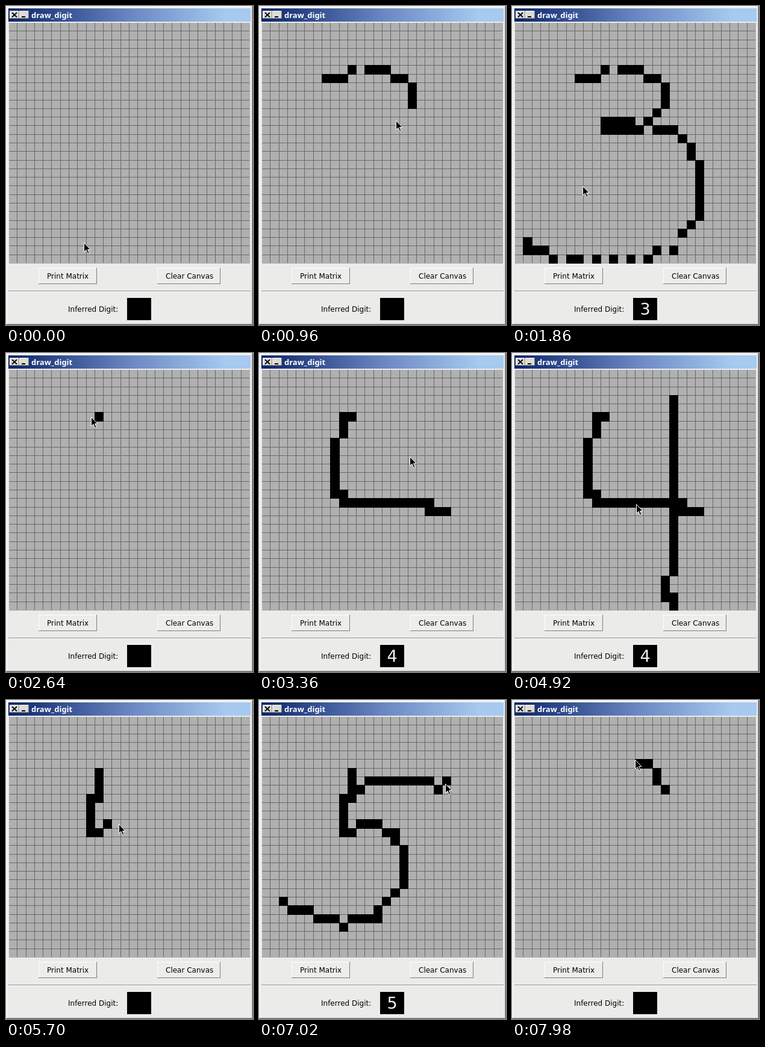
These frames come from a looping animation (410x530 px, 8000 ms). An HTML page:

```html
<!DOCTYPE html>
<html lang="en">
<head>
<meta charset="utf-8">
<title>draw_digit</title>
<style>
  html, body { margin: 0; width: 100%; height: 100%; overflow: hidden; background: #ebebe9; }
  svg { position: absolute; left: 0; top: 0; }
  span { position: absolute; white-space: pre; font: 12px/14px "DejaVu Sans", sans-serif; color: #000; }
  .title { left: 42px; top: 6px; font: bold 13px/18px "Noto Sans", "Open Sans", sans-serif; color: #fff; }
  #digit { left: 201px; top: 488px; width: 40px; text-align: center; font-size: 27px; line-height: 31px; color: #f2f2f2; }
  .crisp { shape-rendering: crispEdges; }
</style>
</head>
<body>
<svg width="410" height="530">
  <defs>
    <linearGradient id="bar">
      <stop offset="0" stop-color="#0a246a"/>
      <stop offset=".5" stop-color="#6986c2"/>
      <stop offset=".9" stop-color="#a6caf0"/>
    </linearGradient>
  </defs>
  <g class="crisp">
    <path d="M1.5 529V1.5H408" fill="none" stroke="#fff"/>
    <path d="M408.5 1V528.5H1" fill="none" stroke="#a0a09c"/>
    <path d="M409.5 0V529.5H0" fill="none" stroke="#606060"/>
    <rect x="4" y="4" width="402" height="22" fill="url(#bar)"/>
    <g id="bevels"></g>
    <rect x="26" y="17" width="6" height="2"/>
    <rect x="5" y="28" width="400" height="400" fill="#b0b0b0"/>
    <path id="grid" fill="none" stroke="#686868"/>
    <path id="cells"/>
    <path d="M4 473.5H406" stroke="#8c8c8a"/>
    <path d="M4 474.5H406" stroke="#fff"/>
    <rect x="201" y="485" width="40" height="37"/>
  </g>
  <path d="M10 11L18 18.5M18 11L10 18.5" stroke="#000" stroke-width="1.8"/>
  <path id="cursor" d="M0 0V15L3.5 11.8L6.2 18L8.6 17L6 11H10.5Z" stroke="#fff"/>
</svg>
<span class="title">draw_digit</span>
<span style="left:68px;top:442px">Print Matrix</span>
<span style="left:265px;top:442px">Clear Canvas</span>
<span style="left:103px;top:497px">Inferred Digit:</span>
<span id="digit"></span>

<script>
const LOOP = 8000, STEP = 60, PAINT_LAG = 20;
const COUNT = 28, PITCH = 400 / COUNT, LEFT = 4, TOP = 27;
const byId = id => document.getElementById(id);
const lineX = i => LEFT + Math.round(i * PITCH);
const lineY = i => TOP + Math.round(i * PITCH);

const track = [], painted = [], readings = [];
let cleared = 0;

// The pointer glides to a place, arriving at the given time.
function move(time, x, y) {
  track.push({ time, x, y });
}

function infer(time, digit) {
  readings.push({ time, digit });
}

function clearCanvas(time) {
  move(time, 292, 442);
  infer(time, "");
  for (const cell of painted) cell.until ??= time;
}

// Corner cells "col,row" joined by lines; ".." is a fast line that skips every other cell.
function rasterize(path) {
  const cells = [];
  let from;
  for (const [, gap, col, row] of path.matchAll(/( |\.\.|^)([\d]+(?:\.\d+)?),(\d+(?:\.\d+)?)/g)) {
    const to = [+col, +row];
    from ??= to;
    const n = Math.round(Math.max(Math.abs(to[0] - from[0]), Math.abs(to[1] - from[1])));
    const stride = gap === ".." ? 2 : 1;
    for (let k = 0; k < n || !cells.length;) {
      k = Math.min(k + stride, n);
      cells.push(from.map((v, axis) => Math.round(v + (to[axis] - v) * (n ? k / n : 0))));
    }
    from = to;
  }
  return cells;
}

function draw(start, end, path) {
  const cells = rasterize(path);
  cells.forEach(([col, row], i) => {
    const time = start + (end - start) * i / (cells.length - 1);
    painted.push({ time: time + PAINT_LAG, col, row });
    track.push({ time, x: LEFT + (col + .5) * PITCH, y: TOP + (row + .5) * PITCH, drawing: i > 0 });
  });
}

infer(0, "");
move(0, 129, 393);
draw(720, 1650, "7,6 9,6 10,5..12,5 14,5 17,7 17,9 15,11..13,11 10,11 10,12 14,12..16,12 18,12 21,16 " +
  "21,22 19,24..18,26..16,26..15,27..7,27 6,27..4,27 3,26 1,26 1,25");
infer(1670, "3");
move(1860, 117, 299);
clearCanvas(2200);

draw(2620, 3170, "10,5 9,5 9,7 8,8 8,14 9,14 9,15 19,15 19,16 21,16");
infer(3190, "4");
move(3360, 250, 172);
draw(3560, 4020, "18,3 18,23 17,24 17,26 18,26 18,27");
move(4140, 200, 430);
move(4920, 206, 251);
clearCanvas(5030);

draw(5480, 6160, "10,6 10,9 9,9 9,13 11,12 13,12 15,13 16,16 16,19 13,22 13,23 10,23 9,24 8,23.4 2,21.4");
infer(6190, "5");
move(6480, 130, 147);
draw(6690, 6990, "10,8 11,8 12,7 19,7 20,8 21,7");
move(7020, 309, 139);
clearCanvas(7530);

draw(7820, 7930, "17,8 16,7 16,6 15,5 14,5");
move(7980, 204, 99);

function pointerAt(t) {
  const i = track.findIndex(key => key.time > t);
  if (i < 0) return track[track.length - 1];
  const a = track[i - 1], b = track[i];
  let u = (t - a.time) / (b.time - a.time);
  if (!b.drawing) u = (1 - Math.cos(Math.PI * u)) / 2;
  return { x: a.x + (b.x - a.x) * u, y: a.y + (b.y - a.y) * u };
}

function cellPath({ col, row }) {
  const x = lineX(col), y = lineY(row);
  return `M${x} ${y}H${lineX(col + 1) + 1}V${lineY(row + 1) + 1}H${x}Z`;
}

function bevel(x, y, w, h, fill) {
  return `<rect x="${x}" y="${y}" width="${w}" height="${h}" fill="${fill}"/>` +
    `<path d="M${x + .5} ${y + h}V${y + .5}H${x + w}" fill="none" stroke="#fff"/>` +
    `<path d="M${x + w - .5} ${y}V${y + h - .5}H${x}" fill="none" stroke="#7c7c7a"/>`;
}

byId("bevels").innerHTML = bevel(6, 8, 16, 13, "#dedbd5") + bevel(22, 8, 16, 13, "#dedbd5") +
  bevel(54, 435, 97, 27, "#ededeb") + bevel(251, 435, 105, 27, "#ededeb");

let grid = "";
for (let i = 1; i < COUNT; i++)
  grid += `M${lineX(i) + .5} 28V427M5 ${lineY(i) + .5}H404`;
byId("grid").setAttribute("d", grid);

function render(t) {
  const visible = painted.filter(cell => cell.time <= t && !(cell.until <= t));
  byId("cells").setAttribute("d", visible.map(cellPath).join(""));
  byId("digit").textContent = readings.filter(r => r.time <= t).pop().digit;
  const { x, y } = pointerAt(t);
  byId("cursor").setAttribute("transform", `translate(${Math.round(x) + .5} ${Math.round(y) + .5})`);
}

const began = performance.now();
function tick() {
  const t = (performance.now() - began) % LOOP;
  render(Math.floor(t / STEP) * STEP);
  requestAnimationFrame(tick);
}
tick();
</script>
</body>
</html>
```
